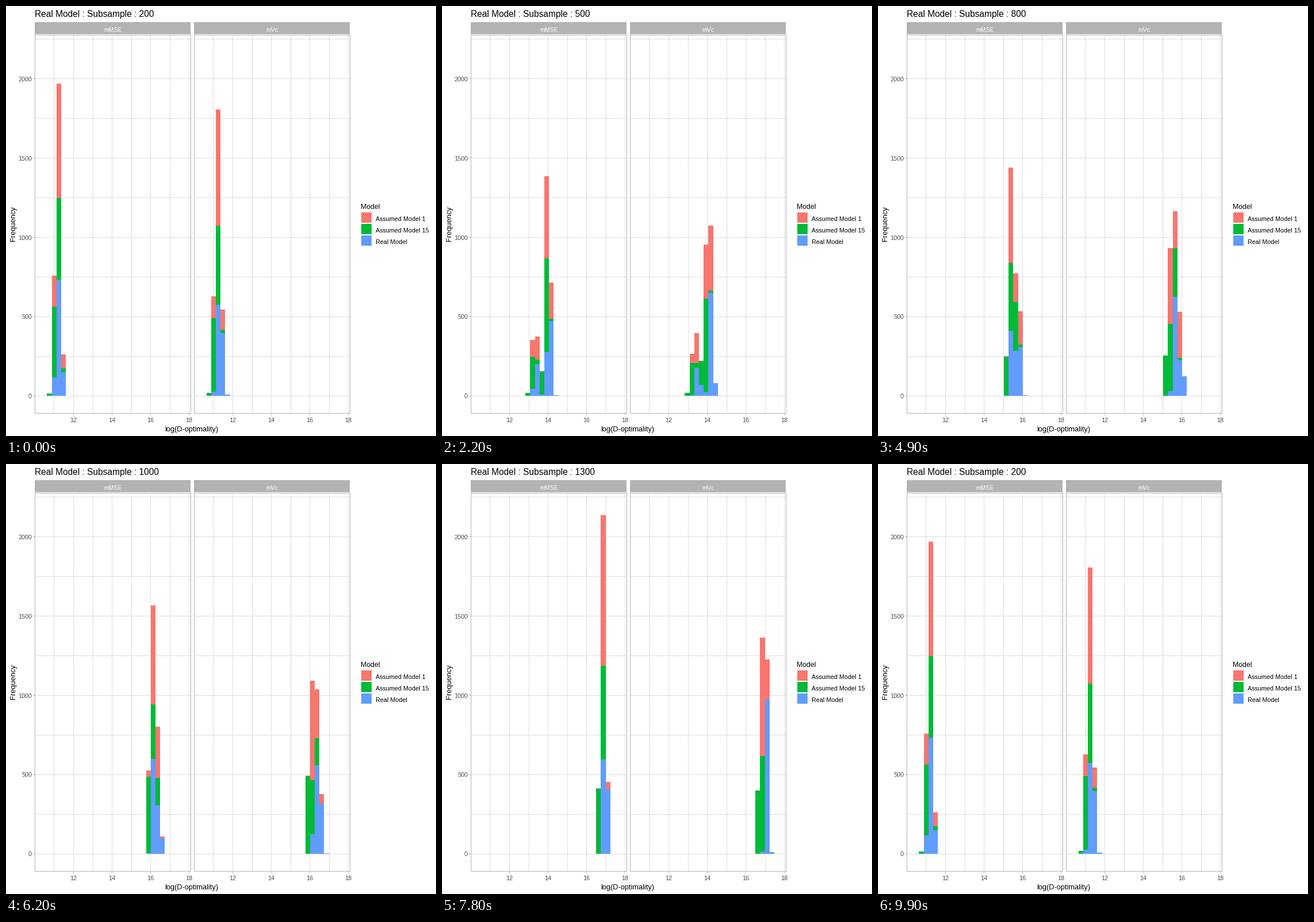
Recreate the animation shown at these times as a matplotlib script. Size 748 by 748 pixels, loop 10000 ms.

```python
import math

import matplotlib.pyplot as plt
import numpy as np
from matplotlib.animation import FuncAnimation
from matplotlib.collections import PolyCollection
from matplotlib.patches import Rectangle

STAGE, DPI, INTERVAL = 748, 64, 100
BINS, RUNS = 30, 1000
SIZES = range(200, 1501, 100)

GREY, GRID, AXIS_TEXT = "#B3B3B3", "#DEDEDE", "#4D4D4D"
RED, GREEN, BLUE = "#F8766D", "#00BA38", "#619CFF"
PANELS = {"mMSE": 50, "mVc": 327}
PANEL_W, PANEL_TOP, PANEL_BOTTOM = 272, 50, 709
BAR_X, BAR_W, PANEL_STEP = 63.24, 8.195, 277.17

# Mean bin position at four key sizes; a cubic in log(size) joins them
KEY_SIZES = [200, 400, 800, 1300]
MEANS = {
    "mMSE": {BLUE: [3.534, 12.33, 20.923, 26.947],
             GREEN: [3.047, 11.545, 20.097, 26.055],
             RED: [3.389, 12.075, 20.633, 26.624]},
    "mVc": {BLUE: [3.888, 12.795, 21.454, 27.48],
            GREEN: [3.023, 11.544, 20.088, 26.061],
            RED: [3.488, 12.263, 20.845, 26.85]},
}
SPREAD = {BLUE: 0.45, GREEN: 0.48, RED: 0.45}
SHRINK = 0.37


def counts(size, color, means):
    """Normal bin counts: the mean rises and the spread shrinks with size."""
    mean = np.polyval(np.polyfit(np.log(KEY_SIZES), means, 3), math.log(size))
    sd = SPREAD[color] * (size / SIZES[0]) ** -SHRINK
    cdf = [0.5 * (1 + math.erf((e - mean) / (sd * math.sqrt(2)))) for e in range(BINS + 1)]
    return np.round(RUNS * np.diff(cdf))


def stacks(size):
    """Stack edges, indexed by panel, layer and bin."""
    return np.array([
        np.cumsum([np.zeros(BINS)] + [counts(size, c, m) for c, m in models.items()], axis=0)
        for models in MEANS.values()
    ])


def build_timeline():
    """One (state, blend) pair per frame: four holds, then a linear change."""
    timeline = []
    for state in range(len(SIZES)):
        steps = 4 if state < 3 else 3
        timeline += [(state, 0)] * 4
        timeline += [(state, (j + 1) / steps) for j in range(steps)]
    # The surplus middle frame is dropped so the loop is an even ten seconds
    del timeline[len(timeline) // 2]
    return timeline


STACKS = [stacks(size) for size in SIZES]
TIMELINE = build_timeline()


def y_of(count):
    return 678 - 0.276 * count


def bar_edge(panel, k):
    return math.floor(BAR_X + PANEL_STEP * panel + BAR_W * k + 0.5)


fig = plt.figure(figsize=(STAGE / DPI, STAGE / DPI), dpi=DPI, facecolor="white")
ax = fig.add_axes([0, 0, 1, 1])
ax.set_xlim(0, STAGE)
ax.set_ylim(STAGE, 0)
ax.axis("off")


def box(x, y, w, h, color, z=1):
    ax.add_patch(Rectangle((x, y), w, h, fc=color, ec="none", lw=0, antialiased=False, zorder=z))


def label(x, y, text, px, color="black", ha="left", va="baseline", **kw):
    return ax.text(x, y, text, fontsize=px * 72 / DPI, color=color, ha=ha, va=va,
                   family="Liberation Sans", zorder=5, **kw)


def draw_panel(name, left):
    height = PANEL_BOTTOM - PANEL_TOP
    for value in range(11, 19):
        x = round(left + 67 + 33.55 * (value - 12))
        box(x, PANEL_TOP, 1, height, GRID)
        if value % 2 == 0:
            box(x, PANEL_BOTTOM, 1, 3, GREY)
            label(x + 0.5, 724, str(value), 10.8, AXIS_TEXT, "center")
    for value in range(0, 2251, 250):
        box(left, round(y_of(value)), PANEL_W, 1, GRID)
    for x in (left, left + PANEL_W - 1):
        box(x, PANEL_TOP, 1, height, GREY, 4)
    for y in (PANEL_TOP, PANEL_BOTTOM - 1):
        box(left, y, PANEL_W, 1, GREY, 4)
    box(left, 28, PANEL_W - 1, 21, GREY)
    label(left + PANEL_W / 2, 44.5, name, 10.5, "white", "center")


for name, left in PANELS.items():
    draw_panel(name, left)

for value in range(0, 2001, 500):
    y = round(y_of(value))
    box(47, y, 3, 1, GREY)
    label(45, y + 4.5, str(value), 10.8, AXIS_TEXT, "right")

label(323, 740, "log(D-optimality)", 12.7, ha="center")
label(13.5, 378.5, "Frequency", 12.9, ha="center", va="center", rotation=90)
label(617, 353, "Model", 12.3)
legend = [(RED, "Assumed Model 1"), (GREEN, "Assumed Model 15"), (BLUE, "Real Model")]
for row, (color, text) in enumerate(legend):
    box(618, 359 + 20 * row, 18, 18, color)
    label(643, 374 + 20 * row, text, 10.75)

title = label(50, 19, "", 15.5)
bars = [PolyCollection([], facecolors=c, edgecolors="none", linewidths=0,
                       antialiaseds=False, zorder=3) for c in SPREAD]
for layer in bars:
    ax.add_collection(layer, autolim=False)


def update(frame):
    state, blend = TIMELINE[frame]
    following = (state + 1) % len(SIZES)
    edges = np.round(y_of((1 - blend) * STACKS[state] + blend * STACKS[following]))
    for i, layer in enumerate(bars):
        quads = []
        for panel in range(len(PANELS)):
            for k in range(BINS):
                low, high = edges[panel, i, k], edges[panel, i + 1, k]
                if low > high:
                    x0, x1 = bar_edge(panel, k), bar_edge(panel, k + 1)
                    quads.append([(x0, low), (x1, low), (x1, high), (x0, high)])
        layer.set_verts(quads)
    nearest = following if blend >= 0.5 else state
    title.set_text(f"Real Model : Subsample : {SIZES[nearest]}")
    return [*bars, title]


anim = FuncAnimation(fig, update, frames=len(TIMELINE), interval=INTERVAL,
                     init_func=lambda: update(0), repeat=True, repeat_delay=0, blit=False)
plt.show()
```
